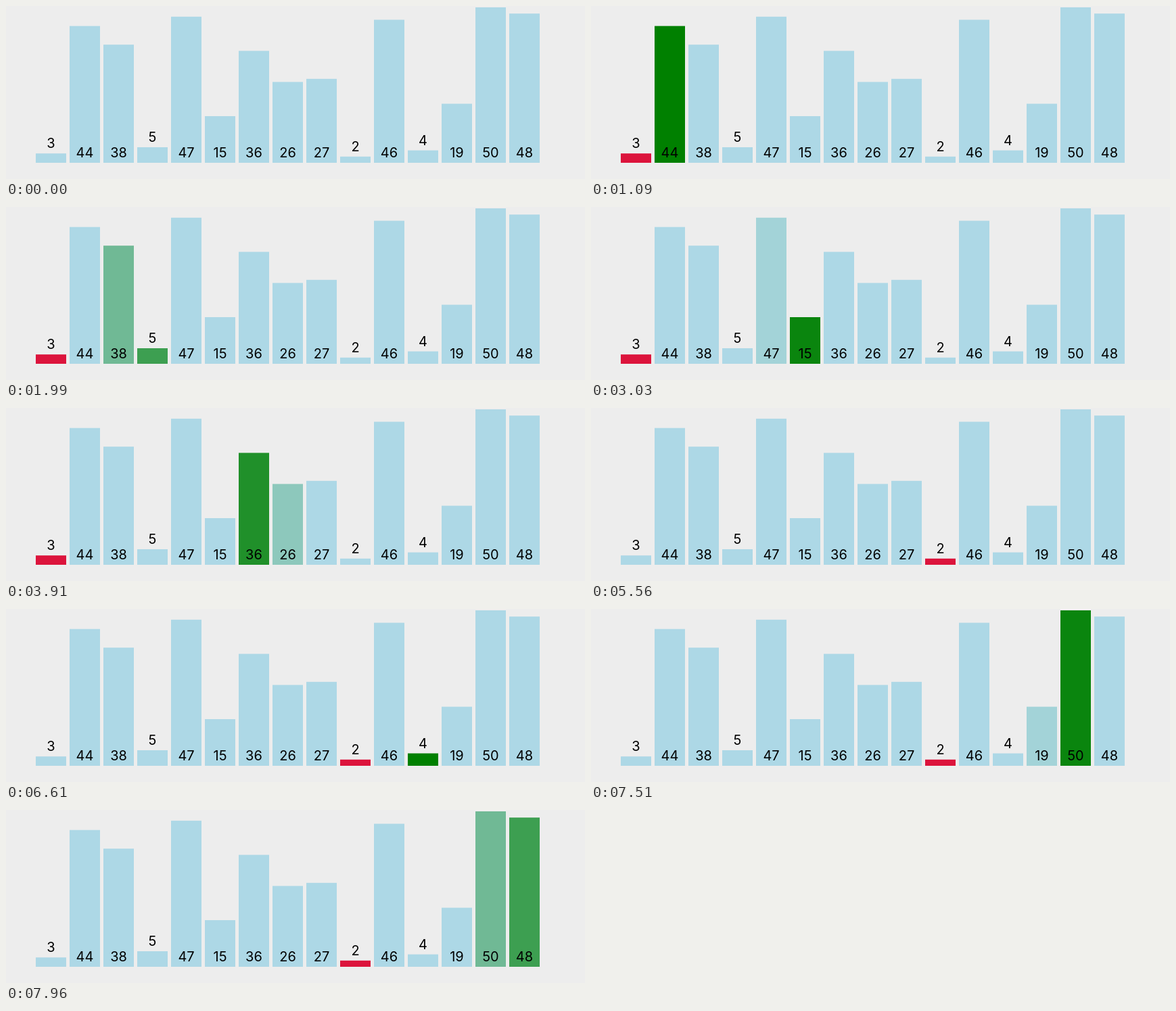
An HTML page for the animation above (8000 ms loop, 856 by 256 pixels).

```html
<!DOCTYPE html>
<html lang="en">
<head>
<meta charset="utf-8">
<title>Selection sort</title>
<style>
  html, body { margin: 0; width: 100%; height: 100%; overflow: hidden; background: #ededed; }
  svg { display: block; }
  text { font: 20px Inter, Arial, sans-serif; text-anchor: middle; }
</style>
</head>
<body>
<svg id="stage" width="856" height="256" viewBox="0 0 856 256"></svg>
<script>
const LOOP = 8000;
const BASE = 232, UNIT = 4.6;
// The picture refreshes every TICK ms from START on; LEAD is the sort's age at START
const START = 480, TICK = 149, LEAD = 139;
const STEP = TICK * 10 / 3, FADE = 250;
const BLUE = [173, 216, 230], RED = [220, 20, 60], GREEN = [0, 128, 0];
const values = [3, 44, 38, 5, 47, 15, 36, 26, 27, 2, 46, 4, 19, 50, 48];

const stage = document.getElementById('stage');

function add(tag, attrs) {
  const el = document.createElementNS('http://www.w3.org/2000/svg', tag);
  for (const key in attrs) el.setAttribute(key, attrs[key]);
  return stage.appendChild(el);
}

const bars = values.map((value, i) => {
  const x = 44 + 50 * i, height = value * UNIT, top = BASE - height;
  const bar = add('rect', { x, y: top, width: 45, height });
  add('text', { x: x + 22.5, y: (value > 5 ? BASE : top) - 8 }).textContent = value;
  return bar;
});

// One pass for the minimum: visit each bar, then mark it if it is the smallest so far
const states = [{}, { min: 0 }];
let min = 0;
for (let scan = 1; scan < values.length; scan++) {
  states.push({ min, scan });
  if (values[scan] < values[min]) {
    min = scan;
    states.push({ min });
  }
}

const colour = (i, state) => i === state.min ? RED : i === state.scan ? GREEN : BLUE;
const cubicInOut = u => u < .5 ? 4 * u ** 3 : 1 - 4 * (1 - u) ** 3;

function draw(now) {
  const tick = Math.floor((now % LOOP - START) / TICK);
  const age = Math.max(0, tick * TICK + LEAD + STEP);
  const step = Math.floor(age / STEP);
  const blend = cubicInOut(Math.min(1, (age - step * STEP) / FADE));
  const before = states[Math.max(0, step - 1)], after = states[step];
  bars.forEach((bar, i) => {
    const from = colour(i, before), to = colour(i, after);
    const rgb = from.map((c, k) => Math.round(c + (to[k] - c) * blend));
    bar.setAttribute('fill', `rgb(${rgb})`);
  });
  requestAnimationFrame(time => draw(Math.max(0, time - origin)));
}

const origin = performance.now();
draw(0);
</script>
</body>
</html>
```
